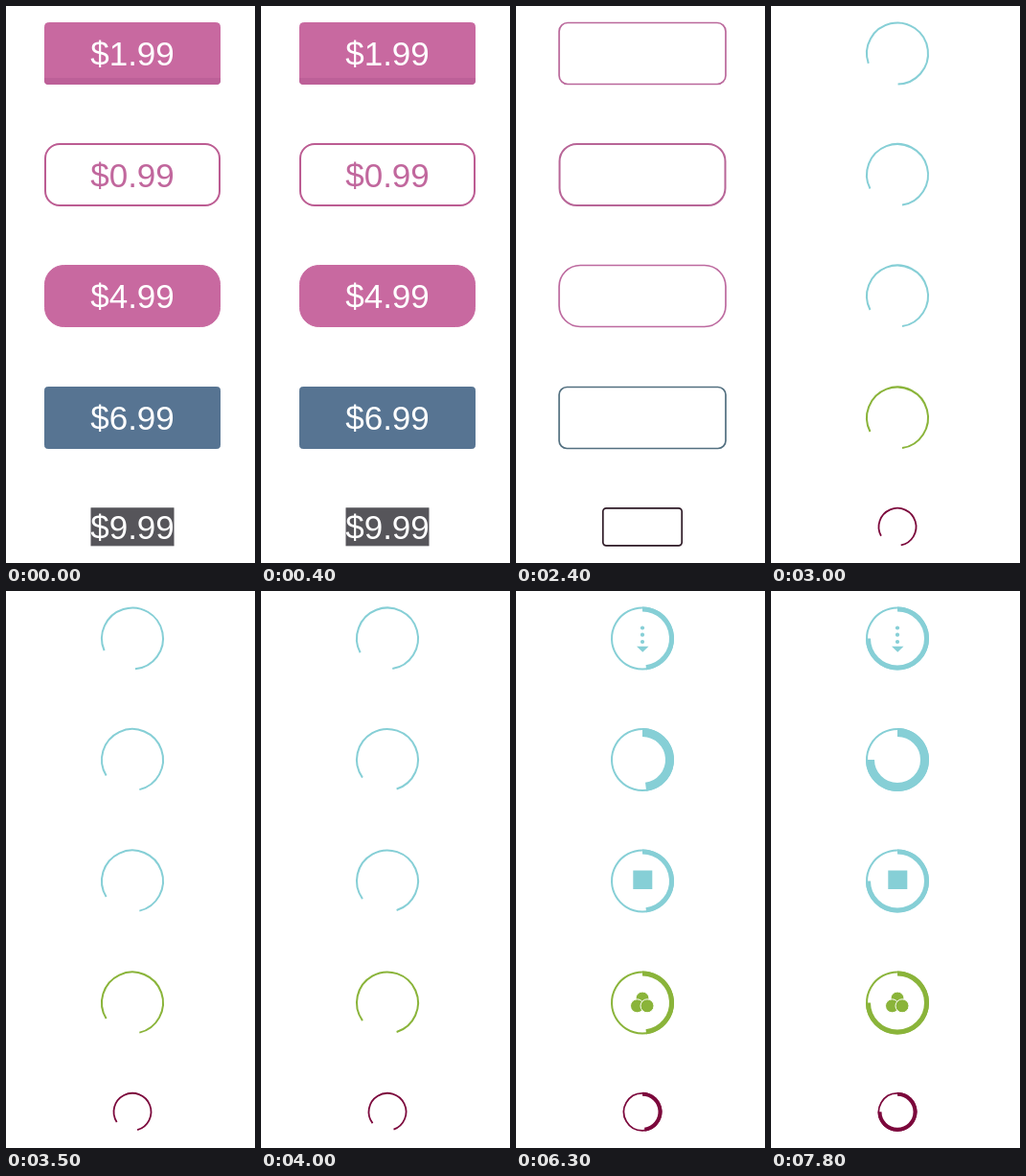
Recreate the animation shown at these times as an HTML page. Size 260x581 px, loop 8000 ms.

```html
<!DOCTYPE html>
<html lang="en">
<head>
<meta charset="utf-8">
<title>Download buttons</title>
<style>
  html, body { margin: 0; width: 100%; height: 100%; overflow: hidden; background: #fff; }
  svg { display: block; width: 260px; height: 581px; }
  text { font: 35px "Liberation Sans", Helvetica, Arial, sans-serif; text-anchor: middle; }
</style>
</head>
<body>
<svg id="stage" viewBox="0 0 260 581"></svg>
<script>
const LOOP = 8000;
const CX = 132;
const TEXT_OFF = 2150;
const FADE = [2165, 2370];
const MORPH = [2315, 2750];
const DOWNLOAD = 4150;
const STEPS = [5160, 6060, 6960];
const STEP_TIME = 300;
const SPIN_SPEED = 0.712; // degrees per ms
const GAP = 72;

const PINK = [200, 105, 160], TEAL = [134, 207, 214];
const rows = [
  { cy: 49.5, w: 183, h: 64, r: 4, price: '$1.99', fill: PINK, line: [190, 96, 150],
    end: TEAL, thick: 5, lead: 8, lip: true, icon: 'arrow' },
  { cy: 176, w: 182, h: 64, r: 15, price: '$0.99', fill: null, line: [188, 92, 146],
    end: TEAL, thick: 9, lead: 0, outlined: true },
  { cy: 302.5, w: 183, h: 64, r: 20, price: '$4.99', fill: PINK, line: [194, 98, 154],
    end: TEAL, thick: 5, lead: 0, icon: 'stop' },
  { cy: 429.5, w: 183, h: 64, r: 3, price: '$6.99', fill: [87, 116, 146], line: [78, 106, 134],
    end: [138, 180, 58], thick: 5, lead: 0, icon: 'trio' },
  { cy: 543.3, w: 86, h: 39, r: 0, price: '$9.99', fill: [86, 85, 90], line: [40, 28, 36],
    end: [124, 8, 60], thick: 4, lead: -2 },
];

const rgb = c => `rgb(${c.map(Math.round)})`;
const clamp = x => Math.min(1, Math.max(0, x));
const mix = (a, b, k) => a + (b - a) * k;
const span = (t, [a, b]) => clamp((t - a) / (b - a));
const ease = x => x < 0.5 ? 2 * x * x : 1 - 2 * (1 - x) * (1 - x);

function add(parent, tag, attrs = {}) {
  const node = document.createElementNS('http://www.w3.org/2000/svg', tag);
  set(node, attrs);
  parent.append(node);
  return node;
}
function set(node, attrs) {
  for (const key in attrs) node.setAttribute(key, attrs[key]);
}
function show(node, on) {
  node.setAttribute('visibility', on ? 'visible' : 'hidden');
}

// Clockwise arc, in degrees from twelve o'clock.
function arc(cy, r, from, to) {
  const point = deg => {
    const a = deg * Math.PI / 180;
    return `${CX + r * Math.sin(a)} ${cy - r * Math.cos(a)}`;
  };
  const sweep = Math.min(to - from, 359.9);
  return `M${point(from)}A${r} ${r} 0 ${sweep > 180 ? 1 : 0} 1 ${point(from + sweep)}`;
}

const icons = {
  arrow(g, cy) {
    for (const dy of [-11, -3.8, 3.5]) add(g, 'circle', { cx: CX, cy: cy + dy, r: 2.1 });
    add(g, 'path', { d: `M126 ${cy + 8.2}h12.5l-6.25 6z` });
  },
  stop(g, cy) {
    add(g, 'rect', { x: 122.3, y: cy - 11, width: 20, height: 19.5 });
  },
  trio(g, cy) {
    for (const [x, dy] of [[132, -4.5], [126.5, 3.3], [137, 3.3]])
      add(g, 'circle', { cx: x, cy: cy + dy, r: 7, stroke: '#fff', 'stroke-width': 1 });
  },
};

const stage = document.getElementById('stage');

function build(row) {
  const { cy, w, h, r } = row;
  const box = { x: CX - w / 2, y: cy - h / 2, width: w, height: h, rx: r };
  row.radius = h / 2;
  row.body = add(stage, 'g');
  if (row.fill) {
    const fill = rgb(row.fill);
    add(row.body, 'rect', { ...box, fill, stroke: fill });
    if (row.lip) {
      const left = box.x - 0.5, right = box.x + w + 0.5, bottom = cy + h / 2 + 0.5;
      add(row.body, 'path', {
        d: `M${left} ${bottom - 7}H${right}V${bottom - 4}q0 4 -4 4H${left + 4}q-4 0 -4 -4z`,
        fill: '#bd6098',
      });
    }
  }
  row.label = add(stage, 'text', {
    x: CX, y: cy + 12.6, fill: row.fill ? '#fff' : '#c1679d',
  });
  row.label.textContent = row.price;
  row.frame = add(stage, 'rect', { fill: 'none' });
  row.ring = add(stage, 'path', {
    fill: 'none', stroke: rgb(row.end), 'stroke-width': h > 50 ? 2 : 1.8,
  });
  row.bar = add(stage, 'path', {
    fill: 'none', stroke: rgb(row.end), 'stroke-width': row.thick,
  });
  row.sign = add(stage, 'g', { fill: rgb(row.end) });
  if (row.icon) icons[row.icon](row.sign, cy);
}

function drawRow(row, t, progress) {
  const { cy, w, h, radius } = row;
  const morph = ease(span(t, MORPH));
  const spinning = t >= MORPH[1];
  const downloading = t >= DOWNLOAD;

  show(row.label, t < TEXT_OFF);
  row.body.setAttribute('opacity', 1 - span(t, FADE));

  show(row.frame, !spinning && (row.outlined || t >= TEXT_OFF));
  const width = mix(w, h, morph);
  set(row.frame, {
    x: CX - width / 2, y: cy - h / 2, width, height: h,
    rx: Math.min(radius, mix(row.r, radius, Math.sqrt(morph) * 0.5 + morph * 0.5)),
    stroke: rgb(row.line.map((c, i) => mix(c, row.end[i], morph))),
    'stroke-width': row.outlined ? 2 : 1.7,
  });

  show(row.ring, spinning);
  const gapStart = 171 + row.lead + (t - 3000) * SPIN_SPEED - (t > 3000 ? (t - 3000) * 0.0005 : 0);
  row.ring.setAttribute('d', downloading
    ? arc(cy, radius, 0, 360)
    : arc(cy, radius, gapStart + GAP, gapStart + 360));

  show(row.bar, downloading && progress > 0);
  row.bar.setAttribute('d', arc(cy, radius + 1 - row.thick / 2, 0, progress));
  show(row.sign, downloading);
}

function draw(t) {
  const progress = STEPS.reduce(
    (sum, start) => sum + 90 * ease(span(t, [start, start + STEP_TIME])), 0);
  for (const row of rows) drawRow(row, t, progress);
}

rows.forEach(build);
draw(0);
let begin;
function tick(now) {
  begin ??= now;
  draw((now - begin) % LOOP);
  requestAnimationFrame(tick);
}
requestAnimationFrame(tick);
</script>
</body>
</html>
```
